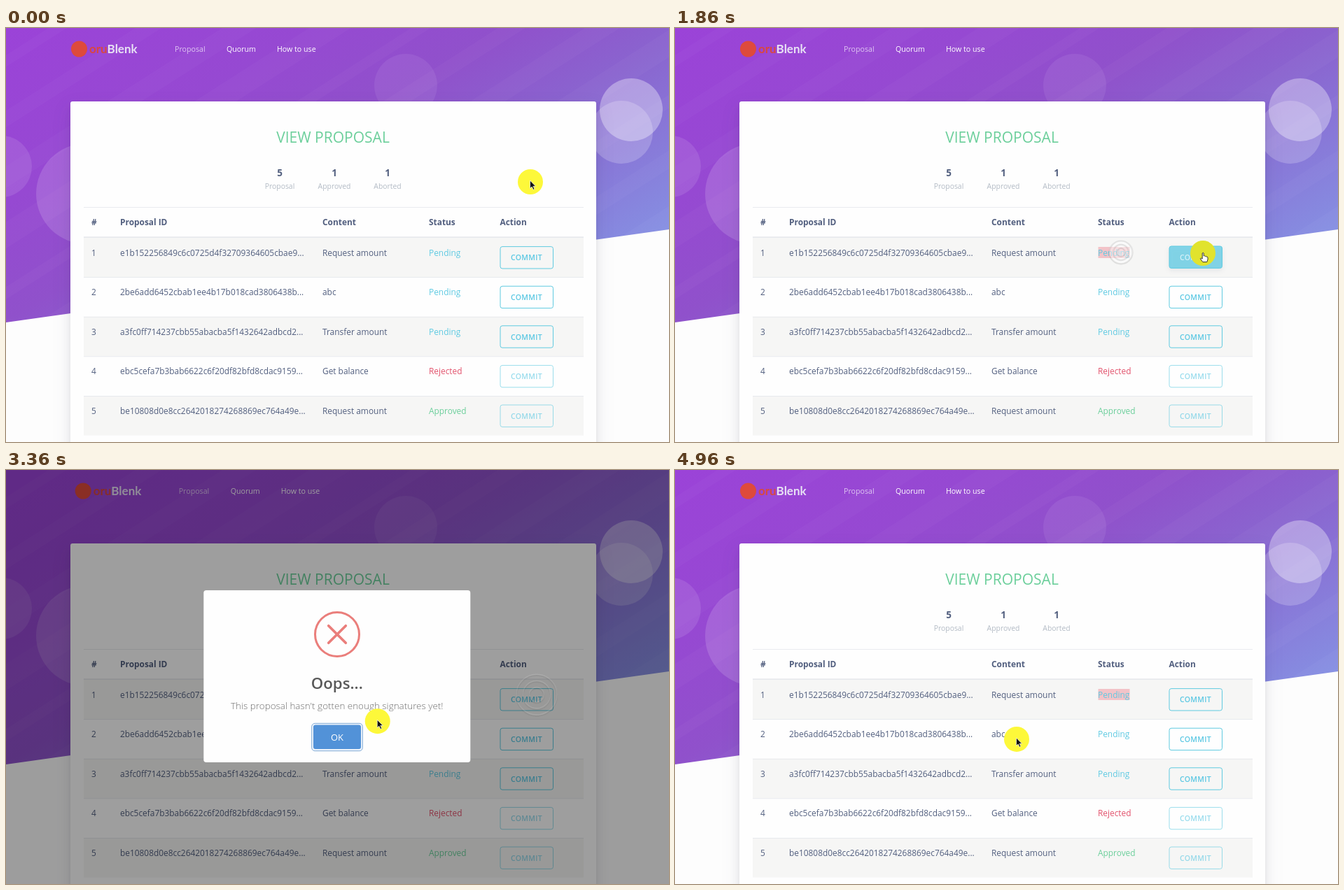
Recreate the animation shown at these times as an HTML page. Size 947x592 px, loop 5 s.

```html
<!DOCTYPE html>
<html lang="en">
<head>
<meta charset="utf-8">
<title>View proposal</title>
<style>
html, body { margin: 0; width: 100%; height: 100%; overflow: hidden; background: #fdfdfd; }
svg { display: block; font-family: "Open Sans", sans-serif; font-size: 11.9px; fill: #525f7f; }
.mid { text-anchor: middle; }
.bold { font-weight: 700; }
.nav { font-size: 10.65px; fill: #fff; }
.brand { font: 700 17px Lato, sans-serif; }
.label { font-size: 10.4px; fill: #b3bbc5; }
.btn { font-size: 10.5px; font-weight: 600; letter-spacing: .26px; fill: #5bc8e3; }
.card { filter: drop-shadow(0 11px 13px rgba(50,50,93,.1)) drop-shadow(0 4px 6px rgba(0,0,0,.07)); }
</style>
</head>
<body>
<svg width="947" height="592" viewBox="0 0 947 592">
  <defs>
    <linearGradient id="sky" gradientUnits="userSpaceOnUse" x1="0" y1="0" x2="361" y2="625">
      <stop offset="0" stop-color="#9b43d8"/>
      <stop offset=".3" stop-color="#9649d2"/>
      <stop offset=".5" stop-color="#9051cb"/>
      <stop offset=".68" stop-color="#8a64cf"/>
      <stop offset="1" stop-color="#868fe2"/>
    </linearGradient>
    <clipPath id="slope"><path d="M0 0H947V288L0 421Z"/></clipPath>
  </defs>

  <g clip-path="url(#slope)">
    <rect width="947" height="592" fill="url(#sky)"/>
    <g id="streaks" stroke="#fff" stroke-opacity=".022"></g>
    <g fill="#fff">
      <circle cx="-7" cy="198" r="44" opacity=".1"/>
      <circle cx="115" cy="237" r="72" opacity=".14"/>
      <circle cx="571" cy="82" r="45" opacity=".07"/>
      <circle cx="879" cy="149" r="45" opacity=".2"/>
      <circle cx="893" cy="117" r="45" opacity=".34"/>
    </g>
  </g>

  <g id="nav">
    <circle cx="104.5" cy="30" r="11.5" fill="#de4a3c"/>
    <text class="brand" x="119" y="35.5" fill="#d9483f">oru<tspan fill="#e8e2f4">Blenk</tspan></text>
    <text class="nav" x="241" y="34" opacity=".68">Proposal</text>
    <text class="nav" x="315" y="34">Quorum</text>
    <text class="nav" x="387" y="34">How to use</text>
  </g>

  <rect class="card" x="92" y="105" width="751" height="600" rx="3" fill="#fefefe"/>
  <text class="mid" x="467" y="163.5" style="font-size:21px;font-weight:500" fill="#6ccf9b">VIEW PROPOSAL</text>
  <g id="table"></g>

  <rect id="shade" width="947" height="592" fill="#000"/>

  <g id="dialog">
    <rect x="282.3" y="172" width="381" height="246" rx="3.75" fill="#fefefe"/>
    <g id="icon" fill="none" stroke="#ea7e7b" stroke-width="3">
      <circle r="31.5"/>
      <path id="cross" d="M-12.3-12.3L12.3 12.3M12.3-12.3L-12.3 12.3" stroke-width="3.7" stroke-linecap="round"/>
    </g>
    <text class="mid" x="472.8" y="313" style="font-size:22.2px;font-weight:600" fill="#595959">Oops...</text>
    <text class="mid" x="472.8" y="342" style="font-size:13.45px;font-weight:300" fill="#6e6e6e">This proposal hasn't gotten enough signatures yet!</text>
    <rect x="436.7" y="362.3" width="72.6" height="39.4" rx="4.5" fill="#eef4fb" stroke="#7fa9d6"/>
    <rect id="ok" x="439" y="364.5" width="68" height="34.5" rx="3"/>
    <text class="mid" x="473" y="386.5" style="font-size:12.9px" fill="#fff">OK</text>
  </g>

  <circle id="wash" fill="#fff"/>
  <g id="cursor">
    <circle id="spot" r="18"/>
    <path id="arrow" d="M-.5-2V9.4L2.1 7 4.1 11.3 6 10.4 4.1 6.3H7.6Z" fill="#111" stroke="#fff" stroke-width=".7"/>
    <path id="beam" d="M-2-6Q0-6 0-4V4Q0 6-2 6M2-6Q0-6 0-4M0 4Q0 6 2 6" fill="none" stroke="#222"/>
    <path id="hand" d="M-.8 0Q.2-1.5 1.2 0V4Q2.6 3 3.3 4.6 4.6 3.8 5.2 5.2 6.8 4.7 7 6.5V9L5.8 12.6H-.2L-3.7 7.8Q-3.2 6.3-.8 8Z" fill="#fff" stroke="#222" stroke-width=".9"/>
  </g>
  <g id="rings" fill="none"></g>
</svg>

<script>
const LOOP = 5000, OPEN = 2695, CLOSE = 4800;
const $ = id => document.getElementById(id);
const set = (id, attrs) => { for (const k in attrs) $(id).setAttribute(k, attrs[k]); };
const clamp = x => Math.max(0, Math.min(1, x));
const span = (t, start, length) => clamp((t - start) / length);
const mix = (a, b, p) => a + (b - a) * p;
const blend = (a, b, p) => `rgb(${a.map((v, i) => Math.round(mix(v, b[i], p)))})`;

// The standard CSS "ease" curve, solved by bisection.
function ease(x) {
  const bez = (s, a, b) => 3 * s * (1 - s) * (1 - s) * a + 3 * s * s * (1 - s) * b + s * s * s;
  let lo = 0, hi = 1;
  for (let i = 0; i < 18; i++) {
    const s = (lo + hi) / 2;
    if (bez(s, .25, .25) < x) lo = s; else hi = s;
  }
  return bez(lo, .1, 1);
}

// Value at t along [time, ...values] keys.
function track(keys, t, curve = x => x) {
  const i = keys.findIndex(k => k[0] > t);
  if (i === 0) return keys[0].slice(1);
  if (i < 0) return keys[keys.length - 1].slice(1);
  const a = keys[i - 1], b = keys[i], p = curve((t - a[0]) / (b[0] - a[0]));
  return a.slice(1).map((v, j) => mix(v, b[j + 1], p));
}

const path = [
  [0, 749, 220], [420, 749, 221], [530, 751, 233], [600, 756, 246], [740, 763, 272],
  [900, 724, 304], [1060, 651, 320], [1300, 644, 320], [1540, 637, 320], [1640, 637, 320],
  [1760, 712, 321], [1860, 754, 322], [2100, 755, 323], [2600, 753, 324], [3200, 753, 324],
  [3360, 531, 359], [3500, 494, 382], [3620, 488, 384], [4300, 488, 384.5], [5000, 488, 385]
];
const clicks = [[0, 746, 222], [1570, 637, 320], [2640, 758, 322], [4350, 488, 384]];
const popKeys = [[0, .7], [.45, 1.05], [.8, .95], [1, 1]];
const crossKeys = [[0, .4, 19, 0], [.5, .4, 19, 0], [.8, 1.15, -4, .8], [1, 1, 0, 1]];

function buildTable() {
  const rows = [
    ["e1b152256849c6c0725d4f32709364605cbae9...", "Request amount", "Pending"],
    ["2be6add6452cbab1ee4b17b018cad3806438b...", "abc", "Pending"],
    ["a3fc0ff714237cbb55abacba5f1432642adbcd2...", "Transfer amount", "Pending"],
    ["ebc5cefa7b3bab6622c6f20df82bfd8cdac9159...", "Get balance", "Rejected"],
    ["be10808d0e8cc2642018274268869ec764a49e...", "Request amount", "Approved"]
  ];
  const colours = { Pending: "#5fcae2", Rejected: "#e2526c", Approved: "#6ccf9b" };
  const columns = [122, 163, 452, 604, 705.5];
  const text = (x, y, s, extra = "") => `<text x="${x}" y="${y}" ${extra}>${s}</text>`;
  const line = (y, h) => `<rect x="111" y="${y}" width="714" height="${h}" fill="#e4e7eb"/>`;
  let out = "";
  [[391, 5, "Proposal"], [469, 1, "Approved"], [545, 1, "Aborted"]].forEach(([x, n, s]) => {
    out += text(x, 212, n, 'class="mid bold" style="font-size:13.5px"') + text(x, 230, s, 'class="mid label"');
  });
  out += line(256, .8);
  ["#", "Proposal ID", "Content", "Status", "Action"].forEach((s, i) => {
    out += text(columns[i], 282.3, s, 'class="bold"');
  });
  rows.forEach((row, i) => {
    const y = 299.6 + i * 56.6, base = y + 26;
    if (i % 2 === 0) out += `<rect x="111" y="${y}" width="714" height="56.6" fill="#f6f6f5"/>`;
    out += i ? line(y, .8) : line(298.4, 1.5);
    if (!i) out += '<rect id="select" x="604.5" y="313" width="45" height="16" fill="#f2c3c8"/>';
    out += text(122, base, i + 1) + text(163, base, row[0]) + text(452, base, row[1]);
    out += text(604, base, row[2], `fill="${colours[row[2]]}"`);
    out += `<g ${i ? "" : 'id="commit"'} opacity="${i > 2 ? .62 : 1}">
      <rect ${i ? "" : 'id="fill"'} x="706" y="${y + 13}" width="75.5" height="31.4" rx="3" fill="#5bcbe4" fill-opacity="0" stroke="#5fcae0"/>
      ${text(743.5, y + 32.7, "COMMIT", `class="btn mid" ${i ? "" : 'id="caption"'}`)}</g>`;
  });
  $("table").innerHTML = out;
}

function buildStreaks() {
  let out = "";
  for (let i = 0; i < 11; i++) {
    const y = 60 + i * 83;
    out += `<path d="M-20 ${y}L980 ${y - 640}" stroke-width="${14 + i * 29 % 23}"/>`;
  }
  $("streaks").innerHTML = out;
}

function drawRipple(t) {
  const [start, x, y] = clicks.filter(c => c[0] <= t).pop();
  const age = t - start, live = age < 850 && t < 4860;
  const fade = live ? 1 - age / 850 : 0, r = 8 + age * .029;
  set("wash", { cx: x, cy: y, r, opacity: fade * .75 * (1 - span(age, 250, 300)) });
  let out = "";
  if (live && age > 20) [1, .68, .36].forEach(k => {
    const ring = (dy, colour, alpha, w) =>
      `<circle cx="${x}" cy="${y + dy}" r="${r * k}" stroke="${colour}" stroke-opacity="${alpha}" stroke-width="${w}"/>`;
    out += ring(.8, "#000", .04 + fade * .09, 2.4) + ring(-.8, "#fff", .1 + fade * .2, 1.6);
  });
  $("rings").innerHTML = out;
  return age < 450 ? Math.sin(Math.PI * age / 450) : 0;
}

function draw(t) {
  const modal = t >= OPEN && t < 4850;
  set("nav", { transform: `translate(${modal ? 5.7 : 0})` });
  set("select", { opacity: t >= 1560 ? 1 : 0 });

  const hover = ease(span(t, 1795, 150)) * (1 - ease(span(t, 2690, 150)));
  set("commit", {
    transform: `translate(0 ${-.8 * hover})`,
    style: `filter:drop-shadow(0 3px 3px rgba(50,50,93,${.14 * hover}))`
  });
  set("fill", { "fill-opacity": hover });
  set("caption", { style: `fill:${blend([91, 200, 227], [255, 255, 255], hover)}` });

  set("shade", { opacity: .38 * span(t, OPEN, 70) * (1 - span(t, 4840, 100)) });

  const shown = t - OPEN, leave = span(t, CLOSE, 60);
  const scale = track(popKeys, clamp(shown / 300), ease)[0] * (1 - .12 * leave);
  set("dialog", {
    transform: `translate(472.8 295) scale(${scale}) translate(-472.8 -295)`,
    opacity: shown < 0 ? 0 : 1 - leave
  });
  const turn = ease(clamp(shown / 500));
  set("icon", {
    transform: `translate(473 235) scale(1 ${Math.cos((1 - turn) * 100 * Math.PI / 180)})`,
    opacity: turn
  });
  const [size, drop, alpha] = track(crossKeys, clamp(shown / 500), ease);
  set("cross", { transform: `translate(0 ${drop}) scale(${size})`, opacity: alpha });

  const press = drawRipple(t);
  const over = span(t, 3490, 60), down = span(t, 4350, 40);
  set("ok", { fill: blend([82, 146, 216], [65, 118, 176], over * .4 + down * .6) });

  const [x, y] = track(path, t);
  set("cursor", { transform: `translate(${x} ${y})` });
  set("spot", { fill: blend([253, 248, 58], [222, 224, 44], press) });
  const hand = t >= 1800 && t < 2690 || t >= 3490 && t < 4800;
  const beam = t >= 1040 && t < 1670;
  set("hand", { opacity: +hand });
  set("beam", { opacity: +beam });
  set("arrow", { opacity: +!(hand || beam) });
}

buildTable();
buildStreaks();
const begin = performance.now();
function tick() {
  draw((performance.now() - begin) % LOOP);
  requestAnimationFrame(tick);
}
tick();
</script>
</body>
</html>
```
